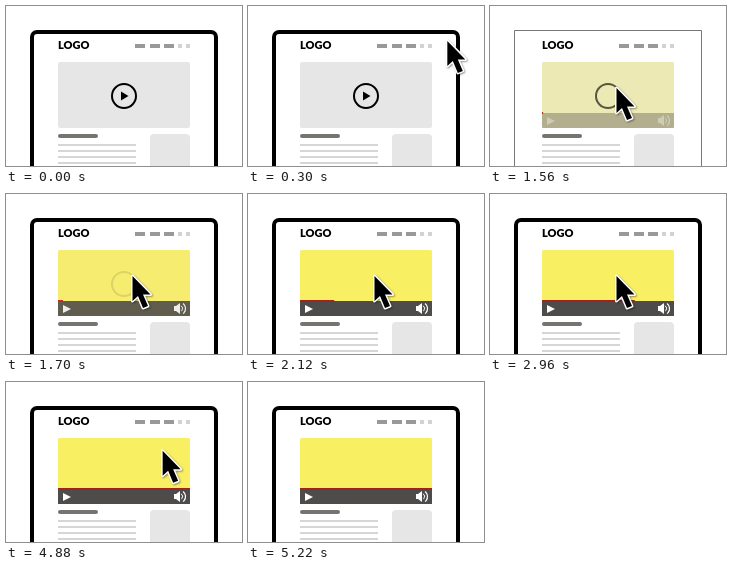
An HTML page with a canvas that plays this animation: 236 by 160 pixels, repeating every 5820 ms.

```html
<!DOCTYPE html>
<html lang="en">
<head>
<meta charset="utf-8">
<title>Video player wireframe</title>
<style>
html, body { margin: 0; width: 100%; height: 100%; overflow: hidden; background: #fff; }
canvas { display: block; }
</style>
</head>
<body>
<canvas id="stage" width="236" height="160"></canvas>
<script>
const ctx = document.getElementById('stage').getContext('2d');
const LOOP = 5820;
const clamp = v => Math.max(0, Math.min(1, v));
const span = (t, from, to) => clamp((t - from) / (to - from));
const mix = (a, b, p) => a + (b - a) * p;
const easeInOut = p => (1 - Math.cos(Math.PI * p)) / 2;
const easeOut = p => 1 - (1 - p) ** 2;

// Playback position: [time, x of the line's end]
const progress = [[1520, 52], [1700, 57], [2680, 125], [2920, 143], [3500, 168], [4100, 179], [4160, 184]];

function rect(x, y, w, h, color, r = 0) {
  ctx.fillStyle = color;
  ctx.beginPath();
  ctx.roundRect(x, y, w, h, r);
  ctx.fill();
}

function shape(points, color) {
  ctx.beginPath();
  points.forEach(([x, y]) => ctx.lineTo(x, y));
  ctx.closePath();
  ctx.fillStyle = color;
  ctx.fill();
}

function arc(x, y, r, from, to, width, color) {
  ctx.beginPath();
  ctx.arc(x, y, r, from, to);
  ctx.lineWidth = width;
  ctx.strokeStyle = color;
  ctx.stroke();
}

function drawPage(thin) {
  rect(0, 0, 236, 160, '#fff');
  ctx.beginPath();
  if (thin) ctx.rect(24.5, 24.5, 187, 160);
  else ctx.roundRect(26, 26, 184, 160, 5);
  ctx.lineWidth = thin ? 1 : 4;
  ctx.strokeStyle = thin ? '#777' : '#000';
  ctx.stroke();

  ctx.fillStyle = '#000';
  ctx.font = '900 11px Lato, Inter, sans-serif';
  ctx.fillText('LOGO', 52, 43);
  for (const x of [129, 144, 158]) rect(x, 38, 10, 4, '#999');
  for (const x of [172, 180]) rect(x, 38, 4, 4, '#d2d2d2');

  rect(52, 128, 40, 4, '#767471', 2);
  for (let y = 138; y < 160; y += 6) rect(52, y, 78, 2, '#d6d6d6');
  rect(144, 128, 40, 40, '#e6e6e6', 4);
}

function drawVideo(t) {
  const shown = easeOut(span(t, 1500, 1800));
  rect(52, 56, 132, 66, '#e6e6e6', 2);

  ctx.globalAlpha = shown;
  rect(52, 56, 132, 66, '#f9ef62', 2);
  rect(52, 107, 132, 15, '#4e4c4b');
  shape([[57, 111], [65, 115], [57, 119]], '#fff');
  shape([[168, 112], [170, 112], [174, 109], [174, 120], [170, 117], [168, 117]], '#fff');
  arc(173, 114.5, 3.5, -0.9, 0.9, 1, '#fff');
  arc(173, 114.5, 6.5, -0.9, 0.9, 1.2, '#fff');

  ctx.globalAlpha = 1 - shown;
  arc(118, 90, 12, 0, 7, 2, '#000');
  if (t < 1520) shape([[115, 85.5], [122.5, 90], [115, 94.5]], '#000');
  ctx.globalAlpha = 1;

  if (t >= 1520) {
    let end = 52;
    for (let i = 1; i < progress.length; i++) {
      const [t0, x0] = progress[i - 1], [t1, x1] = progress[i];
      if (t >= t0) end = mix(x0, x1, span(t, t0, t1));
    }
    rect(52, 106, end - 52, 2, t < 1800 ? '#d02a1c' : '#a2231b');
  }
}

function drawCursor(t) {
  if (t < 60 || t >= 5220) return;
  const enter = easeInOut(span(t, 40, 640));
  const settle = easeInOut(span(t, 640, 850));
  const leave = easeInOut(span(t, 4700, 5220));
  const x = mix(mix(mix(237, 142.5, enter), 126.5, settle), 238, leave);
  const y = mix(mix(mix(7, 77, enter), 82, settle), 33, leave);

  ctx.save();
  ctx.translate(x, y);
  if (t >= 1020 && t < 1260) ctx.rotate(0.08);
  ctx.shadowColor = 'rgba(0, 0, 0, .35)';
  ctx.shadowBlur = 2;
  ctx.shadowOffsetX = ctx.shadowOffsetY = 1;
  ctx.lineWidth = 3;
  ctx.strokeStyle = '#fff';
  ctx.lineJoin = 'round';
  const arrow = [[0, 0], [0, 25], [5.5, 20], [10.5, 32], [15.5, 30], [10.5, 18.5], [18, 18.5]];
  shape(arrow, '#000');
  ctx.stroke();
  ctx.shadowColor = 'transparent';
  shape(arrow, '#000');
  ctx.restore();
}

function frame() {
  const t = performance.now() % LOOP;
  drawPage(t >= 1520 && t < 1600);
  drawVideo(t);
  drawCursor(t);
  requestAnimationFrame(frame);
}
frame();
</script>
</body>
</html>
```
